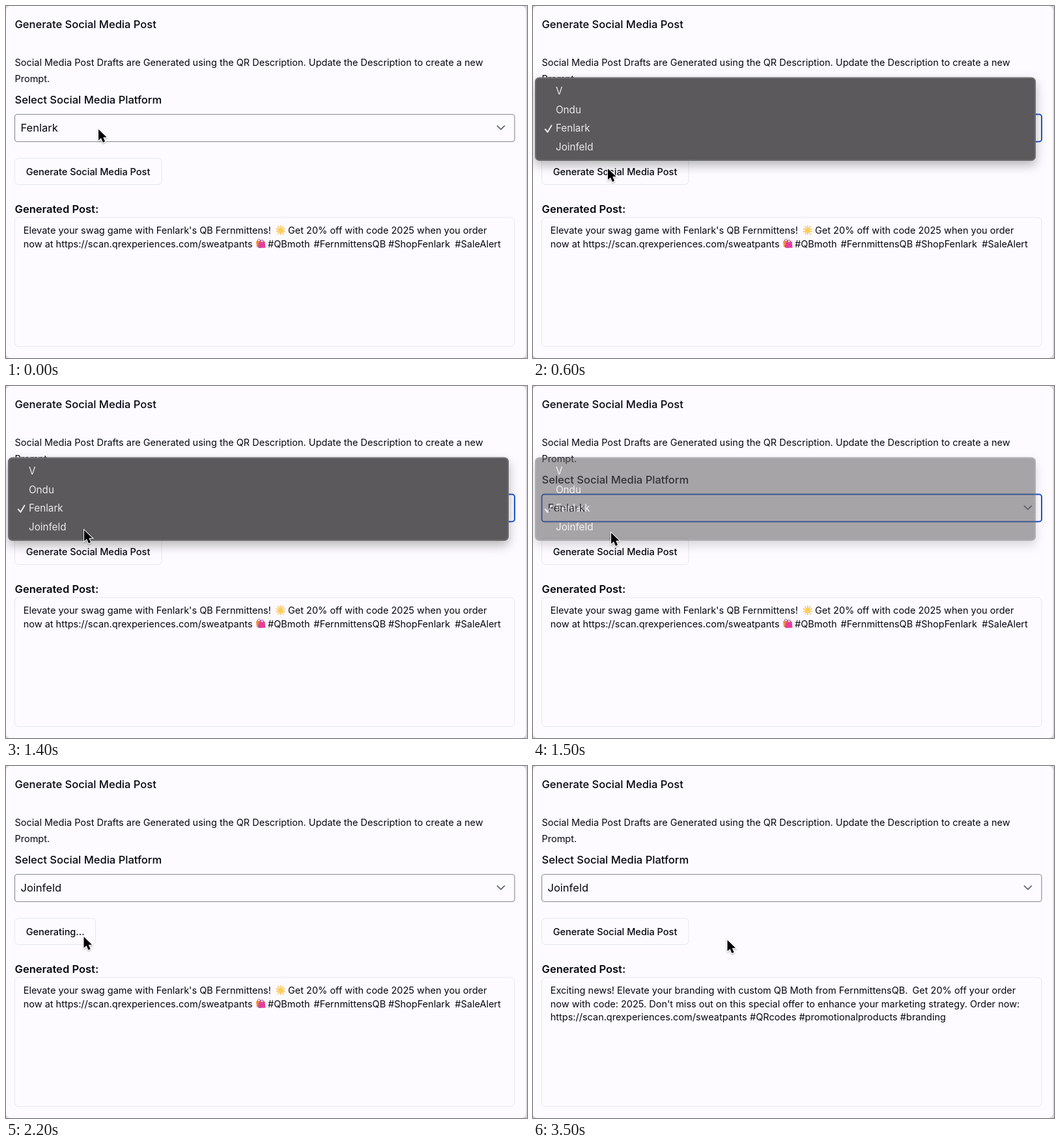
Animation, 800 px wide and 541 px high, one loop 4 s. Source, as an HTML page:

```html
<!DOCTYPE html>
<html lang="en">
<head>
<title>Generate Social Media Post</title>
<style>
  html, body { margin: 0; width: 100%; height: 100%; overflow: hidden; background: #d6d5d9; }
  svg { display: block; width: 800px; height: 541px; font: 14.5px Inter, sans-serif; fill: #05060f; }
  text { white-space: pre; }
  .large { font-size: 16.55px; }
  .medium { font-weight: 500; }
  .semibold { font-weight: 600; }
  .box { fill: none; stroke: #e5e6ec; }
  #menu text { font-size: 15.2px; fill: #e9e8ea; }
</style>
</head>
<body>
<svg viewBox="0 0 800 541">
  <defs>
    <filter id="shadow" x="-10%" y="-30%" width="120%" height="190%">
      <feDropShadow dx="0" dy="7" stdDeviation="8" flood-opacity=".28"/>
    </filter>
    <filter id="soft" x="-50%" y="-50%" width="200%" height="200%">
      <feDropShadow dx="0" dy="1.2" stdDeviation="1" flood-opacity=".35"/>
    </filter>
  </defs>
  <rect width="798.5" height="541" rx="7" fill="#fdfbff"/>

  <text class="large medium" x="13.5" y="34">Generate Social Media Post</text>
  <text x="13.5" y="92.3">Social Media Post Drafts are Generated using the QR Description. Update the Description to create a new</text>
  <text x="13.5" y="117">Prompt.</text>
  <text class="large medium" x="13.5" y="150.3">Select Social Media Platform</text>

  <rect id="select" x="13.5" y="166.5" width="767.5" height="42" rx="4" fill="none"/>
  <text id="choice" class="large" x="22.5" y="193"></text>
  <path d="M754.5 184.3l5.4 5.4 5.4-5.4" fill="none" stroke="#686c76" stroke-width="1.9" stroke-linecap="round" stroke-linejoin="round"/>

  <rect id="button" class="box" x="13.5" y="234" width="225.5" height="40.5" rx="6"/>
  <text id="label" class="medium" x="30.7" y="259.5"></text>

  <text class="large semibold" x="13.5" y="318">Generated Post:</text>
  <rect class="box" x="13.5" y="325" width="767.5" height="198.5" rx="6"/>

  <g id="before">
    <text x="26.7" y="349.7">Elevate your swag game with Fenlark's QB Fernmittens!</text>
    <g transform="translate(421.7 344.7)">
      <path d="M0-7.5V7M-7-2.5L7 2.5M-7 2.5L7-2.5M-4.5 6.5L4.5-6.5M-4.5-6.5L4.5 6.5" stroke="#f3a73c" stroke-width="1.1"/>
      <path d="M0-6L1.7-2 6-1.7 2.7 1 3.8 5.2 0 3-3.8 5.2-2.7 1-6-1.7-1.7-2Z" fill="#fbd04b"/>
    </g>
    <text x="433" y="349.7">Get 20% off with code 2025 when you order</text>
    <text x="26.7" y="370.5">now at https://scan.qrexperiences.com/sweatpants</text>
    <g transform="translate(384 358)">
      <path d="M2.5 4V1.5Q4.5-1 6.5 1.5V4" fill="none" stroke="#8a4a9e"/>
      <path d="M0 3.5L7.5 2.5 8 12.5 1 12.5Z" fill="#f08a3c"/>
      <path d="M6.5 5.5V3Q9 0 11.5 3V5.5" fill="none" stroke="#a52a86"/>
      <path d="M4.5 5L13.5 4 14.5 13.5 4.5 14Z" fill="#e93c9e"/>
      <path d="M4.5 5L3 13 4.5 14Z" fill="#8e3fae"/>
    </g>
    <text x="402" y="370.5">#QBmoth</text>
    <text x="472.5" y="370.5">#FernmittensQB</text>
    <text x="587" y="370.5">#ShopFenlark</text>
    <text x="689.3" y="370.5">#SaleAlert</text>
  </g>
  <g id="after">
    <text x="26.7" y="349.7">Exciting news! Elevate your branding with custom QB Moth from FernmittensQB.</text>
    <text x="582.5" y="349.7">Get 20% off your order</text>
    <text x="26.7" y="370.5">now with code: 2025. Don't miss out on this special offer to enhance your marketing strategy. Order now:</text>
    <text x="333" y="391.2">#QRcodes #promotionalproducts #branding</text>
    <text x="26.7" y="391.2">https://scan.qrexperiences.com/sweatpants</text>
  </g>

  <g id="menu">
    <rect x="3" y="109.5" width="769" height="128.5" rx="7" fill="#4a494c" filter="url(#shadow)"/>
    <rect x="4" y="110.5" width="767" height="126.5" rx="6" fill="#5b595c" stroke="#858387"/>
    <text x="35" y="136">V</text>
    <text x="35" y="164.7">Ondu</text>
    <text x="35" y="193.3">Fenlark</text>
    <text x="35" y="221.8">Joinfeld</text>
    <path d="M18.8 189.5l3.6 4.2 6-10" fill="none" stroke="#e9e8ea" stroke-width="2.1" stroke-linecap="round" stroke-linejoin="round"/>
  </g>

  <g id="cursor" filter="url(#soft)">
    <path d="M0 0V17L4 13.4 6.9 20.2 10.1 18.8 7.2 12.2H12.6Z" fill="#000" stroke="#fff" stroke-width="2" paint-order="stroke"/>
  </g>
</svg>
<script>
const $ = id => document.getElementById(id);
const LOOP = 4000, STEP = 100;
const OPEN = 200, CLOSE = 1400, CHOSEN = 1700, CLICK = 2100, DONE = 3100;

// Pointer stops: time, x, y
const path = [
  [0, 142, 189.5], [200, 140, 191], [600, 115, 250], [700, 115, 250],
  [1200, 120, 223], [1400, 120, 221.5], [1600, 120, 229.5], [2000, 119.5, 262],
  [2200, 119.5, 262.5], [2300, 119.5, 262.5], [3000, 294.5, 270], [3200, 298.5, 267.5], [LOOP, 298.5, 267.5]
];

function pointer(t) {
  const i = path.findIndex(p => p[0] > t);
  const [t0, x0, y0] = path[i - 1], [t1, x1, y1] = path[i];
  const k = (t - t0) / (t1 - t0), e = k * k * (3 - 2 * k);
  return [x0 + (x1 - x0) * e, y0 + (y1 - y0) * e];
}

function set(id, attrs) {
  for (const name in attrs) $(id).setAttribute(name, attrs[name]);
}

function draw(t) {
  const focus = t >= OPEN && t < CLICK;
  const busy = t >= CLICK && t < DONE;
  const fade = t < OPEN ? 0 : Math.min(1, Math.max(0, 1 - (t - CLOSE) / 215));

  set("select", { stroke: focus ? "#1d55cf" : "#868b94", "stroke-width": focus ? 2 : 1.1 });
  $("choice").textContent = t < CHOSEN ? "Fenlark" : "Joinfeld";
  set("button", { width: busy ? 124 : 225.5 });
  $("label").textContent = busy ? "Generating..." : "Generate Social Media Post";
  set("before", { visibility: t < DONE ? "visible" : "hidden" });
  set("after", { visibility: t < DONE ? "hidden" : "visible" });
  set("menu", { opacity: fade });
  set("cursor", { transform: `translate(${pointer(t)})` });
}

const start = performance.now();
function tick() {
  const t = (performance.now() - start) % LOOP;
  draw(Math.floor(t / STEP) * STEP);
  requestAnimationFrame(tick);
}
tick();
</script>
</body>
</html>
```
